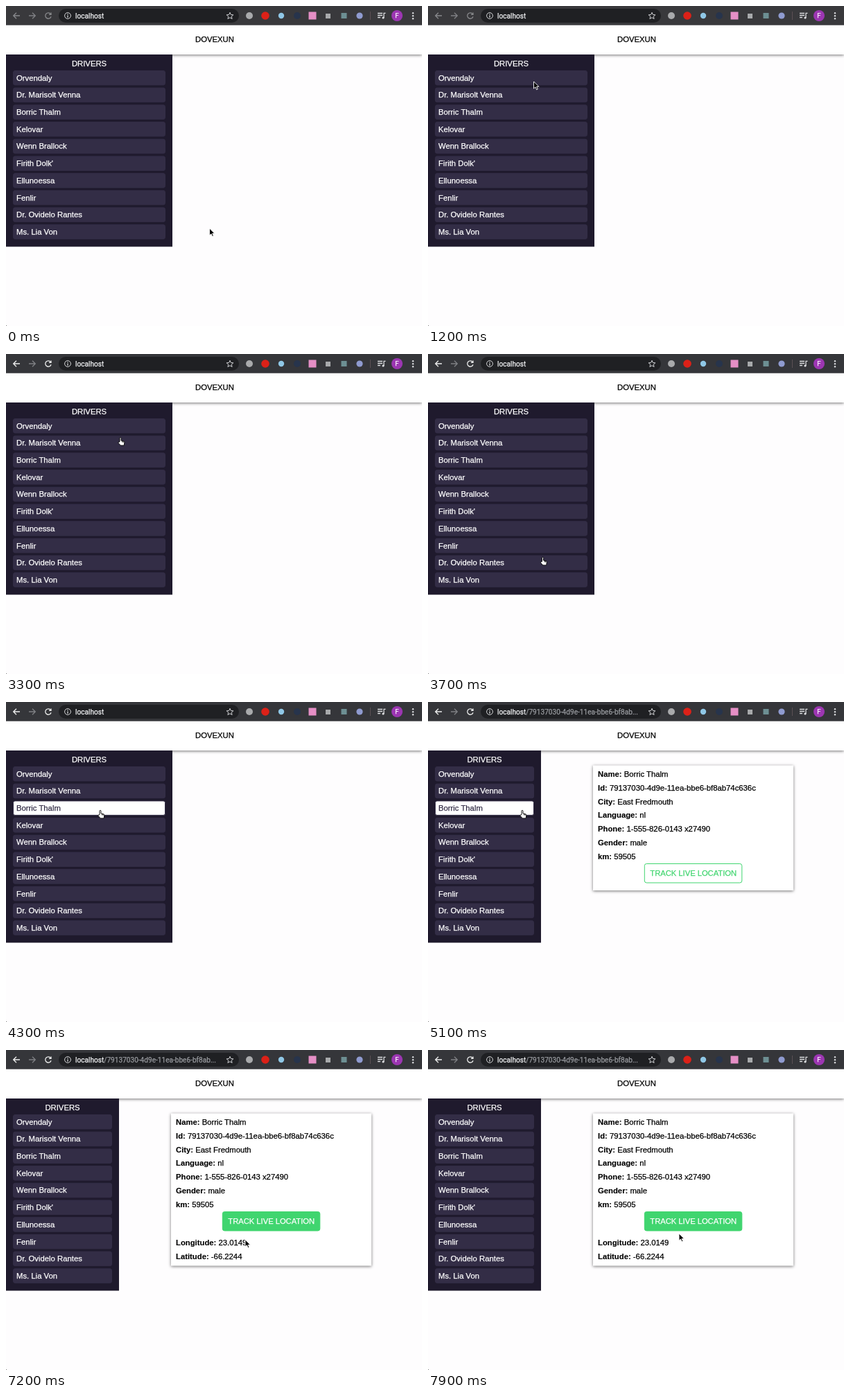
Recreate the animation shown at these times as an HTML page. Size 600 by 462 pixels, loop 8 s.

```html
<!DOCTYPE html>
<html lang="en">
<head>
<meta charset="utf-8">
<title>Drivers</title>
<style>
  html, body { margin: 0; width: 100%; height: 100%; overflow: hidden; background: #fefdfe; }
  svg { display: block; font: 11.3px "Liberation Sans", Arial, sans-serif; }
  text, tspan { fill: currentColor; stroke: currentColor; stroke-width: .25; }
  .bar { font: 10.1px Roboto, sans-serif; }
  .line { fill: none; stroke-width: 1.3; }
  .mid { text-anchor: middle; }
  .shadow { filter: drop-shadow(0 1px 2px rgba(0, 0, 0, .55)); }
  .b { font-weight: bold; stroke-width: .1; }
</style>
</head>
<body>
<svg width="600" height="462" viewBox="0 0 600 462">
  <rect width="600" height="462" fill="#fefdfe"/>
  <rect y="461" width="1" height="1" fill="#777"/>

  <g id="card">
    <rect id="paper" class="shadow" x="238" y="91.5" width="289" fill="#fff"/>
    <g id="facts"></g>
    <rect id="button" x="312.3" y="233.5" width="140.5" height="27.5" rx="3" stroke="#40d56f"/>
    <text id="label" class="mid" x="382.7" y="251" font-size="11.2">TRACK LIVE LOCATION</text>
  </g>

  <rect class="shadow" y="20" width="600" height="50" fill="#fff"/>
  <text class="mid" x="301" y="52">DOVEXUN</text>

  <rect id="side" y="70" height="277.5" fill="#1f1a2d"/>
  <text id="title" class="mid" y="87" color="#fff">DRIVERS</text>
  <g id="rows"></g>

  <g class="bar">
    <rect id="strip" width="600" height="27.7"/>
    <path id="back" class="line" d="M20 14H11M15 9.7L10.7 14L15 18.3"/>
    <path class="line" stroke="#7f8084" d="M33 14H42M38 9.7L42.3 14L38 18.3"/>
    <path id="reload" class="line" d="M64.4 11.6A4.2 4.2 0 1 0 65 15.2M65 9.4V12.4H62"/>
    <rect x="76" y="4" width="260" height="20" rx="10" fill="#1f2023"/>
    <circle class="line" cx="89" cy="14" r="4.4" stroke="#d5d6d8" style="stroke-width:1"/>
    <path class="line" stroke="#d5d6d8" d="M89 11.3V12.5M89 13.5V16.8"/>
    <text x="100" y="17.6" color="#f1f2f4">localhost<tspan id="path" color="#9a9ca1">/79137030-4d9e-11ea-bbe6-bf8ab...</tspan></text>
    <path class="line" stroke="#cfd0d3" style="stroke-width:1" d="M323 9.3l1.4 3.2 3.5.3-2.7 2.3.9 3.4-3.1-1.8-3.1 1.8.9-3.4-2.7-2.3 3.5-.3z"/>
    <circle cx="351" cy="14" r="5" fill="#a9aaac"/>
    <circle cx="374" cy="14" r="5.8" fill="#dc2118"/>
    <circle cx="397" cy="14" r="4.2" fill="#8fc7e6"/>
    <circle cx="420" cy="14" r="5" fill="#27344c"/>
    <rect x="436.5" y="8.5" width="11" height="11" fill="#e58fc6"/>
    <rect x="461" y="11" width="7" height="7" fill="#a7a9ab"/>
    <rect x="483.5" y="10" width="8" height="8" fill="#6d8f93"/>
    <circle cx="510" cy="14" r="4.6" fill="#8f9bd0"/>
    <path stroke="#5b5054" d="M525.5 8V20"/>
    <path class="line" stroke="#dcdde0" d="M536 10.5H543M536 13.5H543M536 16.5H540M545 17V10.4H547.5"/>
    <circle cx="544" cy="17" r="1.6" fill="#dcdde0"/>
    <circle cx="564" cy="14" r="8" fill="#9c36b2"/>
    <text class="mid" x="564" y="17.3" font-size="9.5" color="#fff">F</text>
    <g fill="#dcdde0">
      <circle cx="587" cy="10.2" r="1.2"/><circle cx="587" cy="14.2" r="1.2"/><circle cx="587" cy="18.2" r="1.2"/>
    </g>
  </g>

  <g id="cursor">
    <path id="arrow" fill="#000" stroke="#fff" stroke-width=".9" d="M0 0V10.2L2.4 8L4.1 11.8L5.8 11L4.2 7.4H7.4Z"/>
    <path id="hand" fill="#fff" stroke="#000" stroke-width=".9" stroke-linejoin="round"
      d="M-1 6.2V.9a1 1 0 0 1 2 0V4.5l3.5.7q1.4.4 1.3 1.8L5.2 11.4H.3L-3.1 7.7q-.4-1.3.8-1.1zM2.7 5V7M4.2 5.3V7.2"/>
  </g>
</svg>
<script>
const $ = id => document.getElementById(id);
const set = (el, attrs) => { for (const k in attrs) el.setAttribute(k, attrs[k]); };
const show = (el, on) => set(el, { visibility: on ? "visible" : "hidden" });

const names = ["Orvendaly", "Dr. Marisolt Venna", "Borric Thalm", "Kelovar", "Wenn Brallock",
  "Firith Dolk'", "Ellunoessa", "Fenlir", "Dr. Ovidelo Rantes", "Ms. Lia Von"];
$("rows").innerHTML = names.map((name, i) => {
  const y = 93.5 + i * 24.7;
  return `<rect x="10.5" y="${y}" height="20.5" rx="2.5" stroke="#332d46"/><text x="15" y="${y + 14.1}">${name}</text>`;
}).join("");

const facts = [["Name", names[2]], ["Id", "79137030-4d9e-11ea-bbe6-bf8ab74c636c"],
  ["City", "East Fredmouth"], ["Language", "nl"], ["Phone", "1-555-826-0143 x27490"],
  ["Gender", "male"], ["km", "59505"], ["Longitude", "23.0149"], ["Latitude", "-66.2244"]];
$("facts").innerHTML = facts.map(([key, value], i) =>
  `<text x="245" y="${108 + i * 19.8 + (i > 6 ? 35.3 : 0)}"><tspan class="b">${key}:</tspan> ${value}</text>`).join("");

const LOOP = 8000, FOCUS = 1700, OPEN = 4700, TRACK = 7100;
const GREEN = "#40d56f", PURPLE = "#332d46";
const hovers = [[FOCUS, 3300, 0], [4200, 5400, 2]];
const hands = [[FOCUS, 5400], [5600, 7200]];

// Pointer stops: time, x, y
const stops = [[0, 293.5, 321], [400, 293.5, 321], [600, 232, 228], [700, 232, 228],
  [1200, 152.5, 109], [1600, 160, 104], [2200, 165, 100.5], [3200, 165, 100.5],
  [3700, 165.5, 293.5], [4300, 136, 156.5], [5300, 136, 156.5], [5600, 345, 245.5],
  [7000, 345, 245.5], [7500, 345, 326], [7900, 362, 265], [LOOP, 362, 265]];

function pointer(t) {
  const i = stops.findIndex(s => s[0] > t);
  const [t0, x0, y0] = stops[i - 1], [t1, x1, y1] = stops[i];
  const u = (t - t0) / (t1 - t0), e = u * u * (3 - 2 * u);
  return [x0 + (x1 - x0) * e, y0 + (y1 - y0) * e];
}

function draw(t) {
  const within = ([from, to]) => t >= from && t < to;
  const focused = t >= FOCUS, open = t >= OPEN, tracking = t >= TRACK;
  const width = open ? 163 : 240;

  set($("strip"), { fill: focused ? "#35363a" : "#39393c" });
  for (const id of ["back", "reload"]) set($(id), { stroke: focused ? "#eceded" : "#88898c" });
  show($("path"), open);

  set($("side"), { width });
  set($("title"), { x: width / 2 });
  const hover = hovers.find(within);
  names.forEach((_, i) => {
    const lit = hover && hover[2] === i, [box, text] = [...$("rows").children].slice(2 * i);
    set(box, { width: width - 21, fill: lit ? "#fff" : PURPLE });
    set(text, { color: lit ? PURPLE : "#fff" });
  });

  set($("card"), { display: open ? "inline" : "none" });
  set($("paper"), { height: tracking ? 220 : 180.5 });
  set($("button"), { fill: tracking ? GREEN : "#fff" });
  set($("label"), { color: tracking ? "#fff" : GREEN });
  [...$("facts").children].slice(7).forEach(el => set(el, { display: tracking ? "inline" : "none" }));

  const hand = hands.some(within);
  show($("hand"), hand);
  show($("arrow"), !hand);
  set($("cursor"), { transform: `translate(${pointer(t)})` });
}

// Everything advances in steps of 100 ms
function frame() {
  draw(Math.floor(performance.now() % LOOP / 100) * 100);
  requestAnimationFrame(frame);
}
frame();
</script>
</body>
</html>
```
